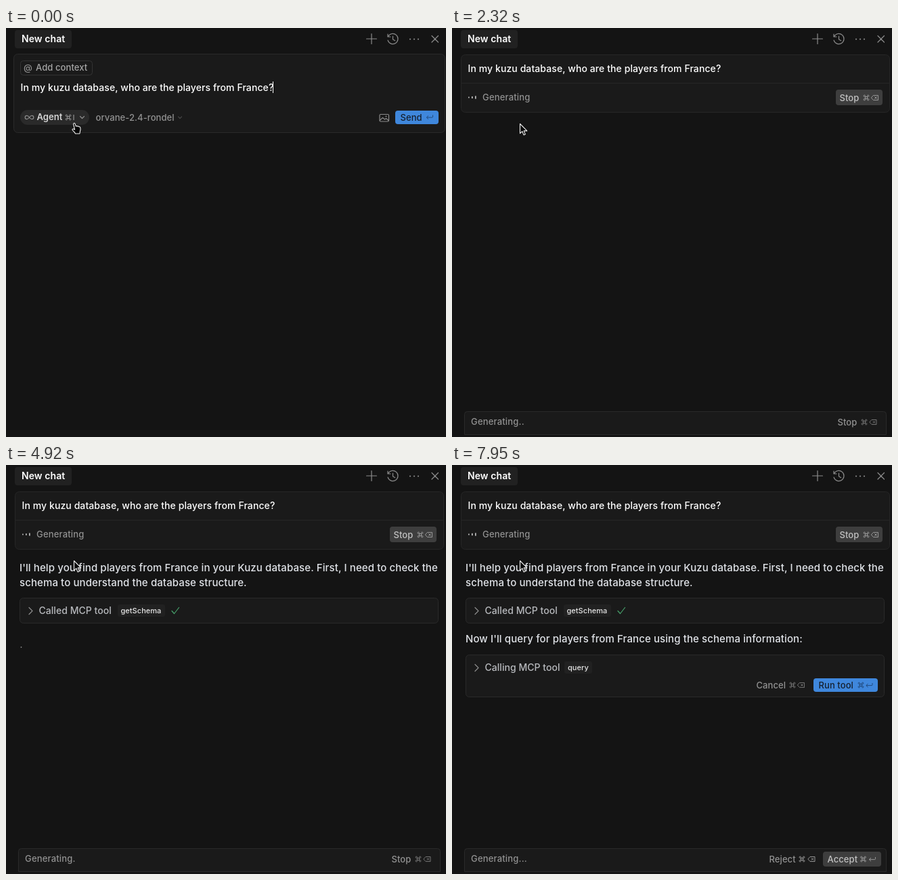
Animation, 650 px wide and 604 px high, one loop 8000 ms. Source, as an HTML page:

```html
<!DOCTYPE html>
<html lang="en">
<head>
<meta charset="utf-8">
<title>Chat panel</title>
<style>
  html, body { margin: 0; width: 100%; height: 100%; overflow: hidden; background: #141414; }
  svg { display: block; }
  text { font: 450 13px Inter, "Open Sans", sans-serif; font-optical-sizing: none; letter-spacing: .08px; fill: #929292; white-space: pre; }
  .title { font-size: 14px; font-weight: 600; letter-spacing: .08px; fill: #fff; }
  .prompt { font-size: 14px; font-weight: 500; letter-spacing: .085px; fill: #fff; }
  .body { font-size: 15px; font-weight: 500; letter-spacing: .1px; fill: #e0e3e8; }
  .tool { font-size: 14px; font-weight: 500; letter-spacing: .04px; fill: #b8babe; }
  .code { font-size: 11px; font-weight: 500; letter-spacing: .03px; fill: #e6e6e6; }
  .status { letter-spacing: .18px; }
  .light { fill: #c2c2c2; }
  .ink { fill: #15202e; }
  .card { fill: #1a1a1a; stroke: #2a2a2a; }
  .chip { fill: #212121; }
  .blue { fill: #3f87dc; }
  .grey { fill: #3e3e3e; }
  .line { fill: none; stroke: #8c8c8c; stroke-width: 1.2; stroke-linecap: round; stroke-linejoin: round; }
  .key { fill: none; stroke: #7c7c7c; stroke-width: .9; stroke-linejoin: round; }
  .key.ink { fill: none; stroke: #1d4474; }
  .key.light { fill: none; stroke: #a0a0a0; }
  .pointer { fill: #050505; stroke: #f4f4f4; stroke-width: 1.1; stroke-linejoin: round; }
</style>
</head>
<body>
<svg width="650" height="604" viewBox="0 0 650 604">
  <defs>
    <path id="cmd" d="M3.5 3.5h3v3h-3zH2.3a1.2 1.2 0 1 1 1.2-1.2zM6.5 3.5V2.3a1.2 1.2 0 1 1 1.2 1.2zM6.5 6.5h1.2a1.2 1.2 0 1 1-1.2 1.2zM3.5 6.5v1.2a1.2 1.2 0 1 1-1.2-1.2z"/>
    <path id="del" d="M4 1.5h7v7H4L.8 5zM5.8 3.3l3.4 3.4M9.2 3.3L5.8 6.7"/>
    <path id="ret" d="M10.5 2v2.6a1 1 0 0 1-1 1H1.5M4 3L1.3 5.6 4 8.2"/>
  </defs>
  <rect width="650" height="604" fill="#141414"/>

  <rect class="chip" x="13" y="3" width="84" height="27" rx="4"/>
  <text class="title" x="23" y="21">New chat</text>
  <path class="line" d="M532.5 16h15M540 8.5v15M629 11.5l9.5 9.5M638.5 11.5l-9.5 9.5"/>
  <path class="line" d="M564 9v4h4M564.6 12.6a7.6 7.6 0 1 1-.5 5.5M571.5 12v4.8l3.2 1.9"/>
  <g fill="#8c8c8c"><circle cx="597" cy="16.5" r="1.1"/><circle cx="603" cy="16.5" r="1.1"/><circle cx="609" cy="16.5" r="1.1"/></g>

  <g id="compose">
    <rect class="card" x="11.5" y="38.5" width="637" height="116" rx="6"/>
    <rect x="21.5" y="48.5" width="106" height="21" rx="4" fill="none" stroke="#333"/>
    <text x="26" y="62.5">@</text>
    <text x="44" y="63" style="fill:#a6a6a6">Add context</text>
    <text class="prompt" x="21.5" y="93">In my kuzu database, who are the players from France?</text>
    <rect id="caret" x="394" y="79" width="1" height="17" fill="#fff"/>
    <rect x="21" y="121" width="102" height="22" rx="11" fill="#2a2a2a"/>
    <path class="line" d="M34.5 132c-1.5-2-2.5-2.7-3.6-2.7a2.7 2.7 0 0 0 0 5.4c1.1 0 2.1-.7 3.6-2.7s2.5-2.7 3.6-2.7a2.7 2.7 0 0 1 0 5.4c-1.1 0-2.1-.7-3.6-2.7z"/>
    <text x="45.5" y="136" style="font-weight:600;fill:#d6d6d6">Agent</text>
    <use class="key light" href="#cmd" x="87" y="127"/>
    <text x="98.5" y="136" style="font-size:11px">I</text>
    <path class="line" d="M109.5 130.5l3 3 3-3"/>
    <text x="132.5" y="137">orvane-2.4-rondel</text>
    <path class="line" d="M254.5 131l2.5 2.5 2.5-2.5" style="stroke:#444"/>
    <rect class="line" x="552" y="127.5" width="13.5" height="10.5" rx="1.5"/>
    <path class="line" d="M552.5 136l4-3.5 3 2.5 2-1.5 3.5 3"/>
    <circle cx="561.5" cy="130.5" r="1" fill="#8c8c8c"/>
    <rect class="blue" x="575" y="122" width="64" height="20" rx="4"/>
    <text class="ink" x="582.5" y="137">Send</text>
    <use class="key ink" href="#ret" x="620" y="126.5"/>
    <g id="tip">
      <rect class="card" x="57.5" y="146.5" width="32" height="26" rx="4"/>
      <use class="key light" href="#cmd" x="65.5" y="154.5"/>
      <text class="light" x="76.5" y="164">.</text>
    </g>
    <path class="pointer" d="M99.6 142.2c-.2-2 2-2.2 2.5-.6l1.2 3.6c.4-1 2-.9 2.3.2.7-.8 2-.5 2.2.6.8-.5 1.9 0 2 1.1.5 2 .3 3.6-.3 5.2l-.6 3.7h-6.4c-.8-1.8-2.5-3.5-4-4.9-1.2-1.3 0-2.6 1.5-1.9l1.6.9z"/>
  </g>

  <g id="answer">
    <rect class="card" x="13.5" y="39.5" width="633" height="85" rx="6" style="stroke:#262626"/>
    <path d="M14 81.5h632" stroke="#262626"/>
    <text class="prompt" x="23.5" y="65">In my kuzu database, who are the players from France?</text>
    <g id="bars" fill="#bdbdbd"><rect x="24" width="1.7"/><rect x="29" width="1.7"/><rect x="34" width="1.7"/></g>
    <text class="status" x="45" y="107">Generating</text>
    <rect class="grey" x="567" y="91" width="69" height="23" rx="4"/>
    <text class="light" x="572.5" y="108">Stop</text>
    <use class="key light" href="#cmd" x="607" y="98"/>
    <use class="key light" href="#del" x="618.5" y="98"/>

    <text class="body" x="20" y="157" id="line1"></text>
    <text class="body" x="20" y="179" id="line2"></text>
    <text class="body" x="20" y="262" id="line3"></text>
    <text x="20.5" y="270" id="wait"></text>
    <g id="called">
      <rect class="card" x="20.5" y="196.5" width="618" height="37" rx="5"/>
      <path class="line" d="M34 210.5l5 5-5 5"/>
      <text class="tool" x="48.5" y="220">Called MCP tool</text>
      <rect class="chip" x="165" y="206" width="70" height="18" rx="3"/>
      <text class="code" x="169.5" y="219">getSchema</text>
      <path class="line" d="M245 215.5l3.5 4 7-9" style="stroke:#46a06b"/>
    </g>
    <g id="calling">
      <rect class="card" x="20.5" y=".5" width="618" height="62" rx="5"/>
      <path class="line" d="M34 14.5l5 5-5 5"/>
      <text class="tool" x="48.5" y="24">Calling MCP tool</text>
      <rect class="chip" id="chip" x="166" y="10" height="18" rx="3"/>
      <text class="code" id="fn" x="171" y="23"></text>
      <text x="449.5" y="50">Cancel</text>
      <use class="key" href="#cmd" x="498" y="40"/>
      <use class="key" href="#del" x="509.5" y="40"/>
      <rect class="blue" x="534" y="35" width="95" height="20" rx="4"/>
      <text class="ink" x="541.5" y="50">Run tool</text>
      <use class="key ink" href="#cmd" x="599" y="40"/>
      <use class="key ink" href="#ret" x="610.5" y="40"/>
    </g>

    <path class="card" d="M18.5 600.5v-30a4 4 0 0 1 4-4h615a4 4 0 0 1 4 4v30z"/>
    <text class="status" x="28" y="586" id="status"></text>
    <g id="stop">
      <text x="569.5" y="587">Stop</text>
      <use class="key" href="#cmd" x="604" y="577"/>
      <use class="key" href="#del" x="616" y="577"/>
    </g>
    <g id="review">
      <text x="468.5" y="587">Reject</text>
      <use class="key light" href="#cmd" x="512" y="577"/>
      <use class="key light" href="#del" x="525" y="577"/>
      <rect class="grey" x="548" y="571" width="86" height="22" rx="4"/>
      <text class="light" x="554.5" y="587">Accept</text>
      <use class="key light" href="#cmd" x="602.5" y="577"/>
      <use class="key light" href="#ret" x="615" y="577"/>
    </g>
    <path class="pointer" d="M100.5 141.5v14.2l3.3-3 2.2 5.2 2.3-1-2.2-5h4.7z"/>
  </g>
</svg>
<script>
  const LOOP = 8000, SENT = 1530;
  // Each entry: [time, words visible from then on]
  const lines = {
    line1: ["I'll help you find players from France in your Kuzu database. First, I need to check the",
      [[3040, 3], [3130, 8], [3220, 12], [3310, 17]]],
    line2: ["schema to understand the database structure.",
      [[3310, 2], [3400, 6]]],
    line3: ["Now I'll query for players from France using the schema information:",
      [[6170, 1], [6260, 8], [6350, 11]]]
  };
  const calls = [
    { from: 4560, to: 4830, y: 196, fn: "getSchema", width: 70 },
    { from: 7520, to: LOOP, y: 280, fn: "query", width: 41 }
  ];

  const $ = id => document.getElementById(id);
  const show = (id, on) => { $(id).style.display = on ? "" : "none"; };
  const put = (id, text) => { if ($(id).textContent !== text) $(id).textContent = text; };

  function typed(text, steps, t) {
    const step = steps.filter(s => t >= s[0]).pop();
    return step ? text.split(" ").slice(0, step[1]).join(" ") : "";
  }

  function render(t) {
    show("compose", t < SENT);
    show("answer", t >= SENT);
    show("caret", t < 540 || (t >= 990 && t < 1440));
    $("tip").style.opacity = t < 810 ? 0 : Math.min(1, (t - 720) / 270);

    for (const id in lines) put(id, typed(...lines[id], t));

    const dots = ".".repeat(Math.floor(t / 170 + .5) % 4);
    put("status", "Generating" + dots);
    put("wait", t >= 4830 && t < 6170 ? dots : "");

    [...$("bars").children].forEach((bar, i) => {
      const h = 2.4 + i * .6 + .7 * Math.sin(2 * Math.PI * (t / 630 - i / 5));
      bar.setAttribute("height", h);
      bar.setAttribute("y", 102.5 - h / 2);
    });

    const call = calls.find(c => t >= c.from && t < c.to);
    show("called", t >= calls[0].to);
    show("calling", call);
    show("review", call);
    show("stop", !call);
    if (call) {
      $("calling").setAttribute("transform", `translate(0 ${call.y})`);
      $("chip").setAttribute("width", call.width);
      put("fn", call.fn);
    }
  }

  const start = performance.now();
  function tick() {
    render((performance.now() - start) % LOOP);
    requestAnimationFrame(tick);
  }
  tick();
</script>
</body>
</html>
```
